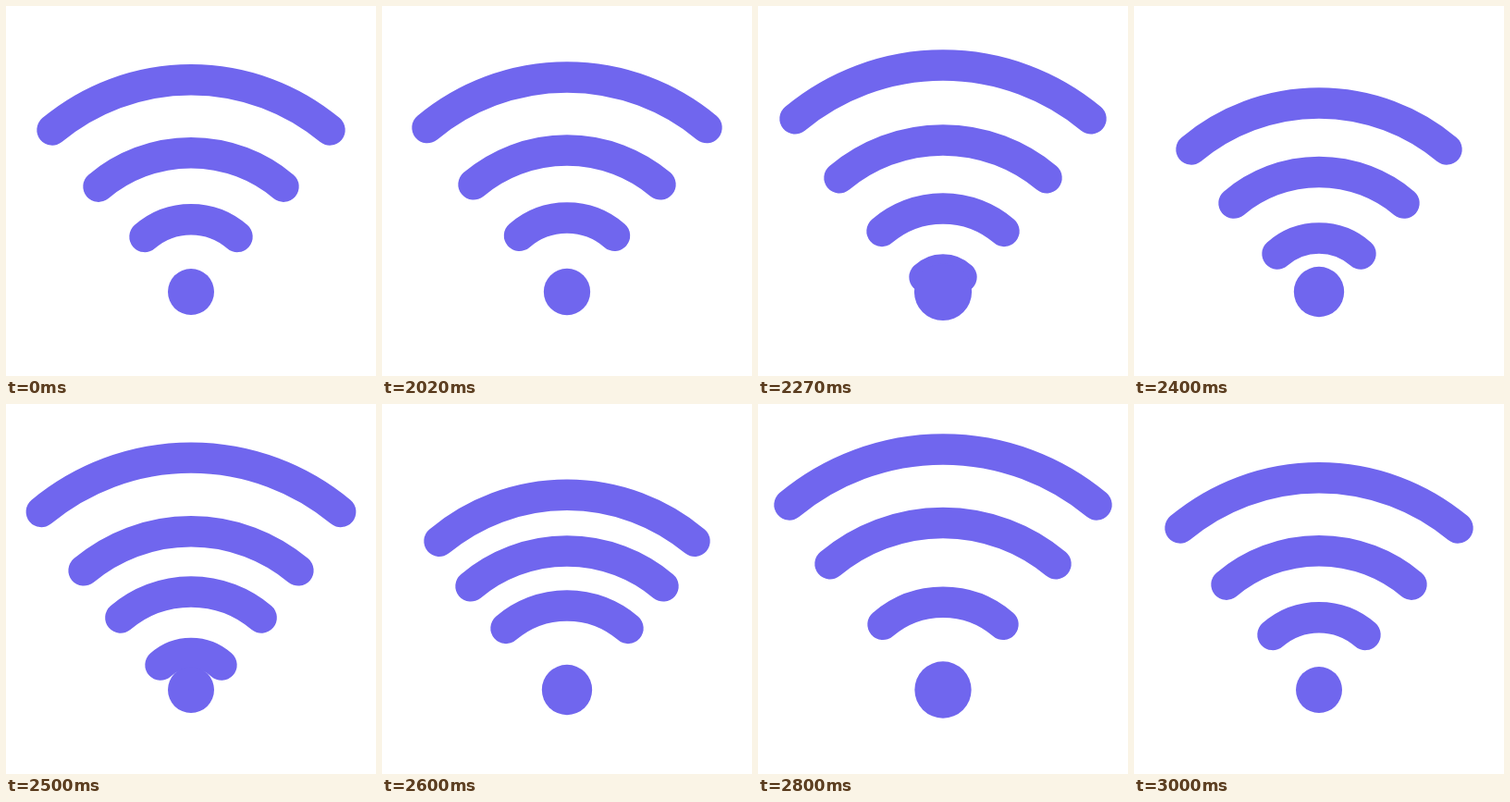
Animation, 400 px wide and 400 px high, one loop 3.02 s. Source, as an HTML page with a canvas:

```html
<!DOCTYPE html>
<html>
<head>
<meta charset="utf-8">
<style>
  html, body { margin: 0; width: 100%; height: 100%; overflow: hidden; background: #fff; }
  canvas { display: block; }
</style>
</head>
<body>
<canvas id="stage" width="400" height="400"></canvas>
<script>
const ctx = document.getElementById('stage').getContext('2d');
const LOOP = 3020, REST = 2000, STEP = 25, MOVE = 1000;

// Keys of each ring: [time, half width, top]. Old rings leave, new ones rise from the dot.
const rings = [
  [[0, 150, 79.7], [25, 151, 77], [125, 167, 47]],
  [[0, 100, 158.7], [25, 101, 156], [275, 160, 64], [325, 167, 47]],
  [[0, 50, 230.7], [25, 51.5, 229], [275, 112, 145], [400, 138, 105], [550, 167, 47]],
  [[0, 0, 309], [275, 66, 219], [400, 92, 179.5], [600, 138, 98.3], [800, 166, 49], [MOVE, 150, 79.7]],
  [[200, 0, 309], [275, 20, 285], [400, 45, 251], [600, 104, 159], [800, 122, 128.5], [MOVE, 100, 158.7]],
  [[400, 0, 309], [600, 66, 218], [800, 65, 214.3], [MOVE, 50, 230.7]]
];

// Slope at a key: flat at the ends and at turning points.
function slope(keys, i, c) {
  const a = keys[i - 1], b = keys[i], d = keys[i + 1];
  if (!a || !d || (b[c] - a[c]) * (d[c] - b[c]) <= 0) return 0;
  return (d[c] - a[c]) / (d[0] - a[0]);
}

function valueAt(keys, t, c) {
  let i = 0;
  while (i < keys.length - 2 && t >= keys[i + 1][0]) i++;
  const a = keys[i], b = keys[i + 1], span = b[0] - a[0];
  const u = (t - a[0]) / span, v = 1 - u;
  return a[c] * v * v * (1 + 2 * u) + b[c] * u * u * (3 - 2 * u) +
    span * u * v * (slope(keys, i, c) * v - slope(keys, i + 1, c) * u);
}

function drawRing(half, top) {
  const sag = 0.355 * half + 1;
  const r = (half * half + sag * sag) / (2 * sag);
  const angle = Math.atan2(half, r - sag);
  ctx.beginPath();
  ctx.arc(200, top + r, r, -Math.PI / 2 - angle, -Math.PI / 2 + angle);
  ctx.stroke();
}

function draw(now) {
  const steps = Math.floor((now % LOOP - REST + 5) / STEP);
  const t = Math.min(MOVE, Math.max(0, steps * STEP));
  ctx.clearRect(0, 0, 400, 400);
  ctx.fillStyle = ctx.strokeStyle = '#7066ee';
  ctx.lineWidth = 33.4;
  ctx.lineCap = 'round';
  for (const keys of rings) {
    const visible = t >= keys[0][0] && t <= keys[keys.length - 1][0];
    if (visible) {
      const half = valueAt(keys, t, 1);
      if (half > 1) drawRing(half, valueAt(keys, t, 2));
    }
  }
  ctx.beginPath();
  ctx.arc(200, 309, 25 + 3.125 * (1 - Math.cos(t / 250 * Math.PI)), 0, 2 * Math.PI);
  ctx.fill();
}

const start = performance.now();
function tick() {
  draw(performance.now() - start);
  requestAnimationFrame(tick);
}
tick();
</script>
</body>
</html>
```
